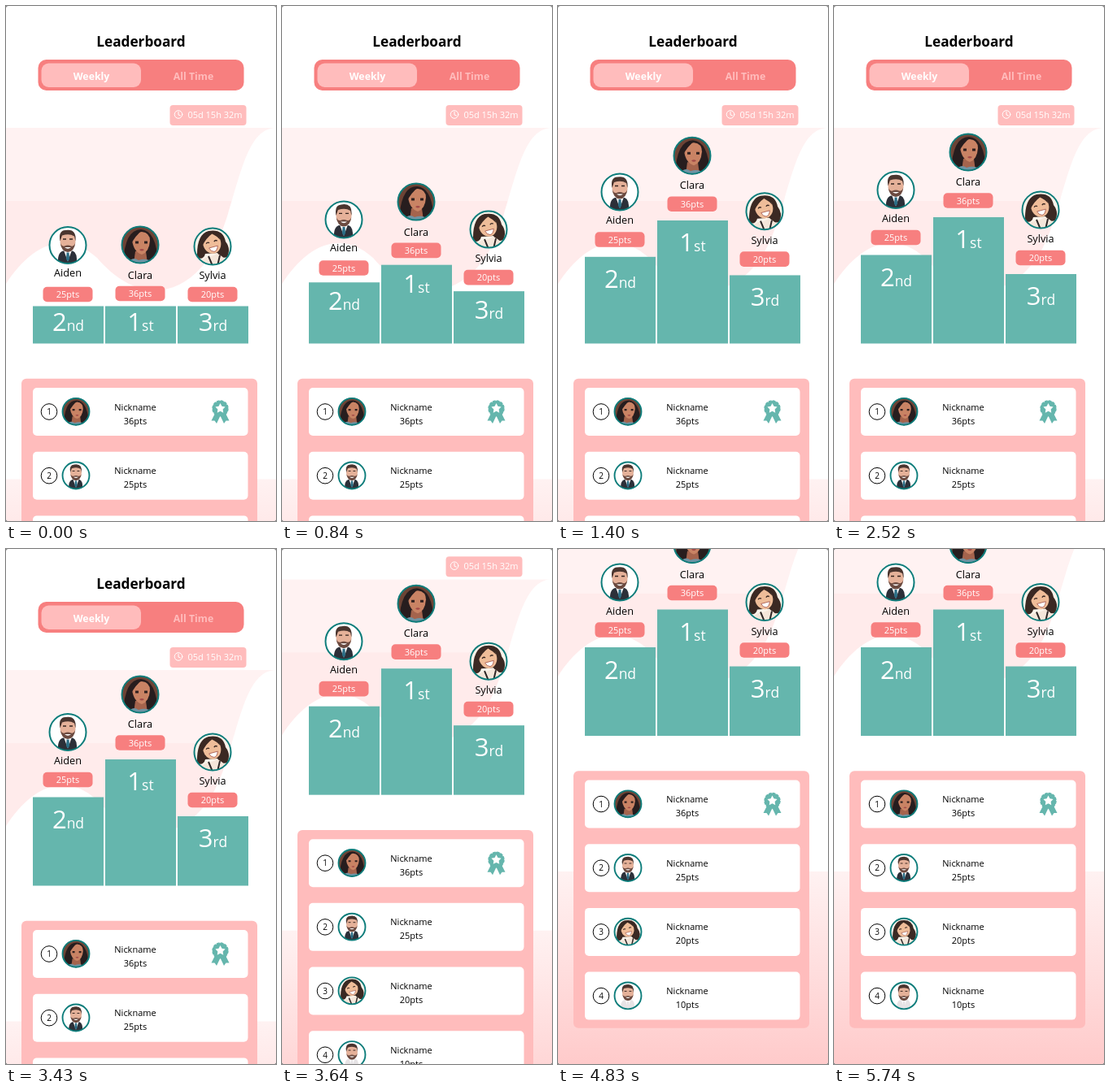
Animation, 332 px wide and 634 px high, one loop 5.95 s. Source, as an HTML page:

```html
<!DOCTYPE html>
<html lang="en">
<head>
<meta charset="utf-8">
<title>Leaderboard</title>
<style>
  html, body { margin: 0; width: 100%; height: 100%; overflow: hidden; background: #777; }
  svg { display: block; width: 332px; height: 634px; border-radius: 3px; background: #fff; font-family: "Open Sans", sans-serif; }
  text { text-anchor: middle; }
  .title { font-size: 17.2px; font-weight: 700; }
  .tab { font-size: 12.3px; font-weight: 700; }
  .name { font-size: 12.7px; }
  .small { font-size: 11px; }
  .rank { font-size: 31px; fill: #fff; }
  .rank tspan { font-size: 17.5px; }
  .white { fill: #fff; }
  .pale { fill: #ffbcbc; }
  .coral { fill: #f77f7f; }
  .teal { fill: #65b6ad; }
  .line { fill: none; stroke: #fff; stroke-linecap: round; }
</style>
</head>
<body>
<svg viewBox="0 0 332 634">
  <defs>
    <linearGradient id="fade" x2="0" y2="1">
      <stop stop-color="#fff2f2"/><stop offset="1" stop-color="#ffcaca"/>
    </linearGradient>
    <clipPath id="round"><circle r="23"/></clipPath>
    <clipPath id="wave">
      <path d="M0 150V342C28 298 70 272 112 310C150 355 200 366 240 322C285 275 282 150 332 150Z"/>
    </clipPath>

    <g id="man">
      <path d="M-12 23Q-13 9-6 7H6Q12 9 11 23Z" fill="var(--coat, #2c3039)"/>
      <path d="M-5 6L0 20 5 6Z" fill="#fff"/>
      <path d="M-1.5 9H1.5L2 17 0 20-2 17Z" fill="var(--tie, #2a6d85)"/>
      <ellipse cy="-5" rx="9.500" ry="12.500" fill="#e5b199"/>
      <path d="M-9.500-5Q-12-18-3-18.500Q11-21 9.500-5L8-11Q2-15-7-12Z" fill="#4a352f"/>
      <path d="M-9.500-4Q-8 8 0 8.500Q8 8 9.500-4Q8 2 4 1Q0-1-4 1Q-8 2-9.500-4Z" fill="#6b4a40"/>
      <path d="M-4 2.500Q0 6 4 2.500Z" fill="#fff"/>
      <path d="M-6-7.500H-2M2-7.500H6" stroke="#35241f" stroke-width="1.300"/>
    </g>
    <g id="girl">
      <rect x="-24" y="-24" width="48" height="48" fill="#6d4335"/>
      <path d="M-21 23Q-19-19 1-19Q20-18 22 23Z" fill="#271d1e"/>
      <path d="M-6 8H7L9 23H-8Z" fill="#a5644d"/>
      <path d="M-17 24Q-10 13-2 19Q10 15 17 24Z" fill="#6f93a3"/>
      <path d="M-10-6Q-9-16 2-16Q12-15 12-5Q11 9 2 12Q-8 9-10-6Z" fill="#c98364"/>
      <path d="M-13 2Q-13-17 3-18Q-5-13-13 2Z" fill="#271d1e"/>
      <path d="M-6-3h4M5-3h4" stroke="#30201f" stroke-width="3"/>
      <path d="M-1 6Q2 4 5 6Q2 9-1 6Z" fill="#a34a48"/>
    </g>
    <g id="smiler">
      <rect x="-24" y="-24" width="48" height="48" fill="#faf3ea"/>
      <path d="M-19 14Q-20-15-5-19Q13-22 16-6Q23 3 18 13Q11 16 6 8L-9 9Q-11 17-19 14Z" fill="#3b2923"/>
      <path d="M-16 24Q-13 12-3 13L6 9Q17 14 18 24Z" fill="#f4e6da"/>
      <path d="M-5 12L0 24M9 11L6 24" stroke="#2d2626" stroke-width="2"/>
      <g transform="translate(-1 -1) rotate(-15)">
        <ellipse cx="1" cy="-3" rx="11" ry="13" fill="#efbd99"/>
        <path d="M-11-3Q-9-18 3-17Q12-15 12-4Q9-10 4-14Q-4-11-11-3Z" fill="#3b2923"/>
        <path d="M-6-4q2-2 4 0M4-4q2-2 4 0" fill="none" stroke="#35241f" stroke-width="1.300"/>
        <path d="M-4 2H7Q5 8 1 8Q-3 7-4 2Z" fill="#fff" stroke="#a85a4d" stroke-width=".8"/>
      </g>
    </g>
  </defs>

  <g id="page">
    <g clip-path="url(#wave)">
      <rect y="150" width="332" height="90" fill="#fff2f2"/>
      <rect y="240" width="332" height="130" fill="#ffebeb"/>
    </g>
    <rect y="582.500" width="332" height="240" fill="url(#fade)"/>

    <text class="title" x="166" y="50">Leaderboard</text>
    <rect class="coral" x="39.500" y="66" width="253" height="38" rx="10"/>
    <rect class="pale" x="43.500" y="70.500" width="122.500" height="29.500" rx="9"/>
    <text class="tab white" x="105" y="90.500">Weekly</text>
    <text class="tab pale" x="230.500" y="90.500">All Time</text>

    <rect class="pale" x="201.500" y="122" width="94" height="25" rx="4"/>
    <circle class="line" cx="212" cy="133.500" r="4.800"/>
    <path class="line" d="M212 130.500V134L214.500 135"/>
    <text class="small white" x="257" y="138">05d 15h 32m</text>

    <g id="podium"></g>
    <rect class="pale" x="19" y="458.800" width="290" height="316.500" rx="6"/>
    <g id="list"></g>
  </g>
</svg>

<script>
const LOOP = 5950, STEP = 70, SCROLL = 185.5;
const $ = id => document.getElementById(id);

const avatar = (kind, r, style = "") => `
  <g transform="scale(${r / 23.5})" style="${style}">
    <circle r="23" fill="#fff"/>
    <g clip-path="url(#round)"><use href="#${kind}"/></g>
    <circle r="22.500" fill="none" stroke="#0d7d7b" stroke-width="${r < 20 ? 2.6 : 2}"/>
  </g>`;

// Each "rise" is [bar, number, avatar, name, badge] travel in pixels.
const podium = [
  { x: 76.5, place: "2", suffix: "nd", name: "Aiden", pts: 25, kind: "man", face: 294.5, label: 332.5, badge: 355, rise: [63, 55, 68, 66.5, 70] },
  { x: 165.5, place: "1", suffix: "st", name: "Clara", pts: 36, kind: "girl", face: 294, label: 336, badge: 354, rise: [109.5, 102, 114, 115, 114.5] },
  { x: 254.5, place: "3", suffix: "rd", name: "Sylvia", pts: 20, kind: "smiler", face: 296, label: 336, badge: 355, rise: [39.5, 32, 45, 45, 45] },
];

$("podium").innerHTML = podium.map(p => `
  <rect class="teal" x="${p.x - 43.5}" width="87"/>
  <text class="rank" x="${p.x}" y="400">${p.place}<tspan>${p.suffix}</tspan></text>
  <g>${avatar(p.kind, 23.5)}</g>
  <text class="name" x="${p.x - .5}" y="${p.label}">${p.name}</text>
  <g>
    <rect class="coral" x="${p.x - 31}" y="${p.badge - 9.3}" width="61" height="18.600" rx="5"/>
    <text class="small white" x="${p.x - .5}" y="${p.badge + 4}">${p.pts}pts</text>
  </g>`).join("");

const star = Array.from({ length: 10 }, (_, i) => {
  const r = i % 2 ? 3.3 : 6.4, a = i * Math.PI / 5;
  return [r * Math.sin(a), -r * Math.cos(a)].map(v => v.toFixed(2));
}).join(" ");

const medal = `
  <g class="teal" transform="translate(263.500 25.500)">
    <path d="M-6 5L-11 15-7 15-4.500 18.500 0 9 4.500 18.500 7 15 11 15 6 5Z"/>
    <circle r="9.600"/>
    <circle r="9.200" fill="none" stroke="#65b6ad" stroke-width="2" stroke-dasharray="3.600 1.217"/>
    <polygon class="white" points="${star}"/>
  </g>`;

const rows = [["girl", 36], ["man", 25], ["smiler", 20], ["man", 10, "--coat:#e6e3e5;--tie:#e6e3e5"]];

$("list").innerHTML = rows.map(([kind, pts, style], i) => `
  <g transform="translate(0 ${470 + i * 78.7})">
    <rect class="white" x="33" width="264.500" height="59" rx="5"/>
    <circle cx="53" cy="29.500" r="9.800" fill="none" stroke="#000"/>
    <text x="53" y="33.300" font-size="10">${i + 1}</text>
    <g transform="translate(86 29.300)">${avatar(kind, 17.2, style)}</g>
    <text class="small" x="159" y="27.500">Nickname</text>
    <text class="small" x="159" y="44.500">${pts}pts</text>
    ${i ? "" : medal}
  </g>`).join("");

function bezier(x1, y1, x2, y2) {
  const at = (a, b, t) => 3 * a * t * (1 - t) ** 2 + 3 * b * t * t * (1 - t) + t ** 3;
  return x => {
    if (x <= 0 || x >= 1) return x <= 0 ? 0 : 1;
    let lo = 0, hi = 1;
    for (let i = 0; i < 24; i++) {
      const mid = (lo + hi) / 2;
      if (at(x1, x2, mid) < x) lo = mid; else hi = mid;
    }
    return at(y1, y2, lo);
  };
}
const growEase = bezier(.25, .1, .25, 1);
const scrollEase = bezier(.4, 0, .4, 1);

const parts = $("podium").children;
const move = (el, x, y) => el.setAttribute("transform", `translate(${x} ${y})`);

function draw() {
  const t = Math.floor(performance.now() % LOOP / STEP) * STEP;
  const grow = growEase((t - 520) / 1160);
  podium.forEach((p, i) => {
    const [bar, rank, face, label, badge] = [...parts].slice(i * 5, i * 5 + 5);
    const up = p.rise.map(d => -d * grow);
    bar.setAttribute("y", 369.5 + up[0]);
    bar.setAttribute("height", 46 - up[0]);
    move(rank, 0, up[1]);
    move(face, p.x - .5, p.face + up[2]);
    move(label, 0, up[3]);
    move(badge, 0, up[4]);
  });
  move($("page"), 0, -SCROLL * scrollEase((t - 3406) / 486));
  requestAnimationFrame(draw);
}
draw();
</script>
</body>
</html>
```
